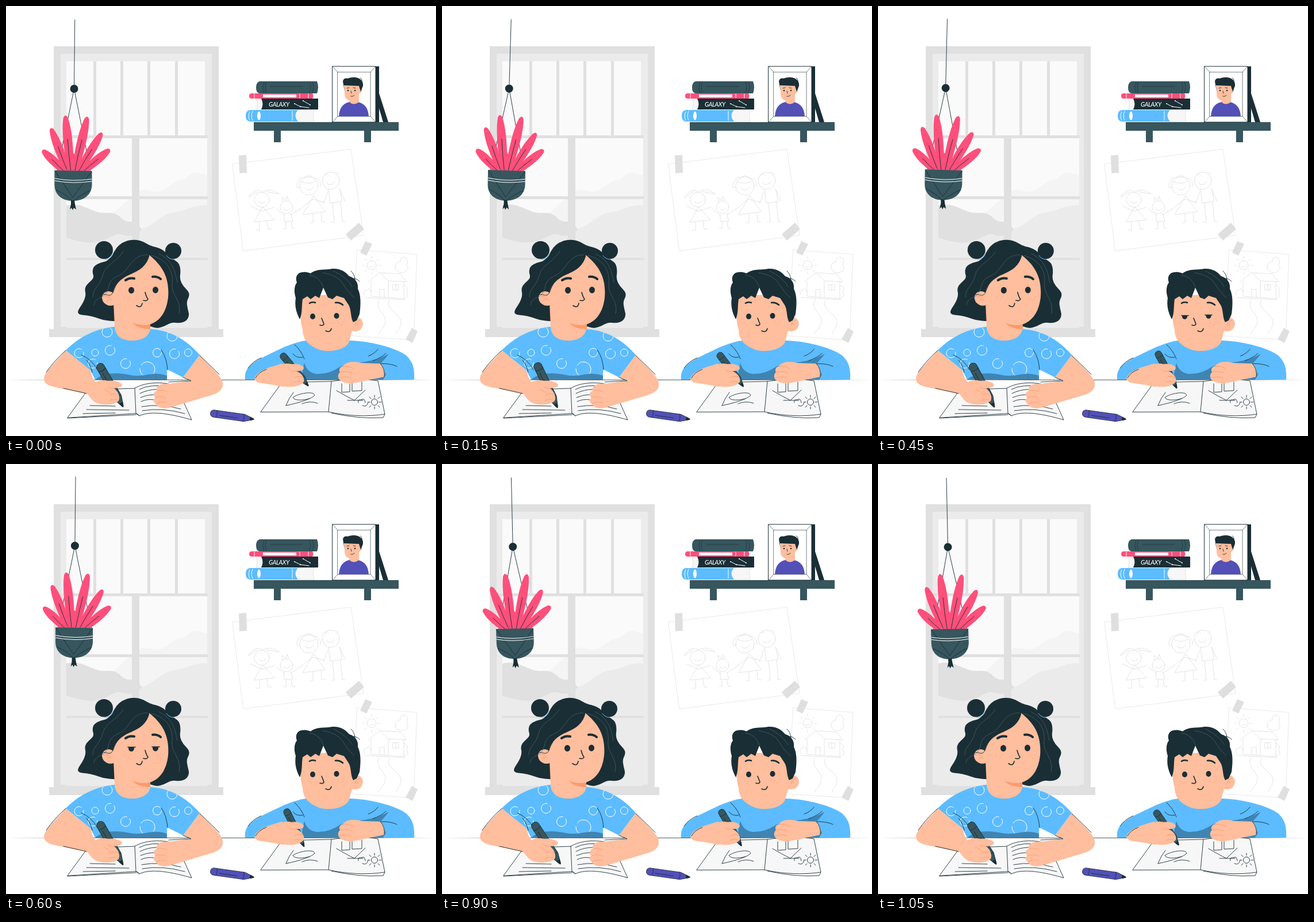
Animation of 748x748 px, one loop 1200 ms. Source, as an HTML page:

```html
<!DOCTYPE html>
<html lang="en">
<head>
<meta charset="utf-8">
<title>Drawing at the table</title>
<style>
  html, body { margin: 0; width: 100%; height: 100%; overflow: hidden; background: #fff; }
  svg { display: block; width: 100%; height: 100%; }
  path, circle, ellipse { stroke-linecap: round; stroke-linejoin: round; }
  .ink { fill: none; stroke: #1a2e35; stroke-width: .9; }
  .fine { stroke-width: .6; }
  .bold { stroke-width: 1.6; }
  .white { fill: none; stroke: #fff; stroke-width: 1; }
  .sketch { fill: none; stroke: #dedede; stroke-width: .8; }
  .paper { fill: #fff; stroke: #e4e4e4; stroke-width: .8; }
  .page { fill: #f7f7f7; stroke: #1a2e35; stroke-width: .9; }
  .fold { fill: none; stroke: #ff9a6c; stroke-width: .9; }
  .strand { fill: none; stroke: #52656b; stroke-width: .7; }
  .dark { fill: #1a2e35; }
  .slate { fill: #37565e; }
  .skin { fill: #ffbe9d; }
  .blue { fill: #5cbcff; }
  .shade { fill: #4084b2; }
  .pink { fill: #ff4f7b; }
  .purple { fill: #5350b8; }
  .orange { fill: #ff9a6c; }
  .grey { fill: #e0e0e0; }
  .pale { fill: #ebebeb; }
  .glass { fill: #fafafa; }
</style>
</head>
<body>
<svg viewBox="0 0 748 748">
  <defs>
    <g id="pen">
      <path d="M-7-37Q-6-43 0-43T7-37L7 24 2 39Q0 44-2 39L-7 24Z" stroke="#1a2e35" stroke-width=".9"/>
      <path class="dark" d="M-3.500 35H3.500L1.500 42Q0 45-1.500 42Z"/>
      <path class="ink" d="M-7-31Q0-28 7-31M-7 22Q0 25 7 22M-2-25V10"/>
    </g>
    <g id="leaf">
      <path class="pink" d="M-5 0C-8-35-10-70-4-95Q0-103 4-95C10-70 8-35 5 0Z"/>
      <path class="ink" vector-effect="non-scaling-stroke" d="M0-4Q-1-30 0-58"/>
    </g>
    <clipPath id="shirtClip"><use href="#shirt"/></clipPath>
    <clipPath id="glassClip"><path d="M105 230H350V560H105Z"/></clipPath>
  </defs>

  <!-- window -->
  <path class="grey" d="M83 70H370V563H83Z"/>
  <path class="pale" d="M95 83H358V558H95Z"/>
  <path class="glass" d="M105 96H346V226H105ZM105 230H350V440H105Z"/>
  <g clip-path="url(#glassClip)">
    <path fill="#f4f4f4" d="M232 322C244 314 254 326 268 322S292 304 304 303 318 290 330 290 343 296 350 294V390H232ZM185 362L220 330V390H185Z"/>
    <path class="pale" d="M105 400L232 388C255 386 268 362 292 359S325 345 350 347V560H105Z"/>
    <path class="grey" d="M105 347C126 342 139 351 155 357S180 357 191 362 203 376 218 375 229 383 237 388C226 399 216 402 203 398S181 404 165 409 133 412 105 403Z"/>
  </g>
  <path class="grey" d="M152 96H157V226H152ZM199 96H204V226H199ZM246 96H251V226H246ZM294 96H299V226H294ZM95 225H351V230H95ZM219 230H232V438H219ZM105 331H351V336H105ZM105 438H351V442H105ZM75 562H378V576H75Z"/>

  <!-- shelf, books, picture frame -->
  <path class="slate" d="M431 202H683V217H635V237H623V217H478V237H466V217H431Z"/>
  <path fill="#f7f7f7" d="M502 181H536Q533 191 536 201H502ZM435 161H452V181H435Q439 171 435 161Z" stroke="#d8d8d8" stroke-width=".7"/>
  <path class="slate" d="M441 131H541Q545 141 541 152H441Q435 151 435 142T441 131Z"/>
  <path class="pink" d="M427 152H533Q536 156 533 161H427Q423 161 423 156.500T427 152Z"/>
  <path class="dark" d="M444 161H543V180H444Q449 171 444 161Z"/>
  <path class="blue" d="M424 181H508Q499 190 508 201H424Q417 200 417 191T424 181Z"/>
  <path fill="#fff" d="M447 154H505V159H447Z"/>
  <ellipse cx="440" cy="191" rx="3" ry="7.500" fill="#fff"/>
  <path class="ink fine" d="M449 133Q445 142 449 151M453 133Q449 142 453 151M460 140H516M528 132Q532 142 528 151M533 132Q537 142 533 151"/>
  <path class="white fine" d="M432 153V160M511 153V160M526 153V160M424 184Q420 191 424 199M429 183Q425 191 429 199M498 183V199M502 170L512 175M512 175L527 177M517 165L529 172"/>
  <g fill="#fff"><circle cx="502" cy="170" r=".9"/><circle cx="512" cy="175" r=".9"/><circle cx="517" cy="165" r=".9"/><circle cx="529" cy="172" r=".9"/></g>
  <text x="457" y="175" fill="#fff" font-family="Lato, sans-serif" font-size="10.500" font-style="italic" font-weight="500" letter-spacing="-.4">GALAXY</text>

  <path class="dark" d="M642 105H649V152L665 202H656L649 178V202H642Z"/>
  <path fill="#fff" stroke="#1a2e35" d="M568 105H643V202H568Z"/>
  <path class="ink fine" d="M577 115H634V192H577ZM568 105L577 115M643 105L634 115M568 202L577 192M643 202L634 192"/>
  <path class="purple" d="M579 192C580 177 586 170 597 167H612C624 170 630 177 631 192Z"/>
  <path class="skin" d="M589 136H615Q622 142 618 150L614 153V167Q605 174 597 167V164Q589 162 589 152Z"/>
  <path class="dark" d="M589 149L586 131Q587 125 594 126 606 122 614 126 622 130 621 139L617 149 614 139 588 138Z"/>
  <path class="ink" d="M593 143L597 142M604 142L608 143M600 148L601 152M600 157Q604 158 606 155M619 132Q620 127 616 125"/>
  <circle class="dark" cx="595" cy="147" r="1.300"/><circle class="dark" cx="607" cy="147" r="1.300"/>

  <!-- drawings on the wall -->
  <path class="paper" d="M394 275L600 249 622 399 413 426Z"/>
  <path class="paper" d="M611 424L715 432 709 581 603 574Z"/>
  <path fill="#dfdfdf" d="M405 260L418 259 419 290 406 291ZM591 397L614 377 623 388 600 408ZM625 409L637 414 627 434 616 429ZM706 560L716 566 707 586 695 580Z"/>
  <g class="sketch">
    <circle cx="445" cy="337" r="13"/><circle cx="488" cy="350" r="11"/><circle cx="527" cy="313" r="16"/><circle cx="565" cy="304" r="15"/>
    <path d="M422 333C428 321 441 317 446 324 456 317 468 321 475 327M422 333L437 323M475 327L453 323M439 340Q446 347 452 339M446 350L431 376 467 372ZM425 348L446 357 467 350M441 376V390H435M454 374L456 388H462"/>
    <path d="M482 341L480 333 487 338 489 331 492 338M483 353Q489 359 494 352M484 362V375L499 374 495 361M470 353L484 364M496 363L512 353M487 376V387H482M496 375L498 387H503"/>
    <path d="M512 315Q503 319 507 308T520 298Q528 292 535 299 550 302 547 314M514 305Q525 312 539 305M520 317Q528 325 535 315M535 330L516 363 555 358ZM510 354L533 336 555 342M534 361V377H529M548 360L549 375H555"/>
    <path d="M552 296Q558 289 561 294M558 308Q566 315 572 305M561 319L564 343 585 340 580 317M560 323L552 344M581 320L590 340M568 343L571 376H566M582 341L585 375H590M573 289L578 293"/>
    <circle cx="636" cy="451" r="8"/>
    <path d="M636 439V435M645 443L648 440M648 451H652M645 459L648 462M636 463V467M627 459L624 462M624 451H620M627 443L624 440M632 453Q636 457 640 452"/>
    <path d="M677 456Q676 446 686 445 685 435 694 437 702 442 697 450 703 459 693 463 682 467 677 456Z"/>
    <path d="M630 480L650 464 686 466 697 480 665 478 650 464M635 479V505L692 509V480M665 479V507M650 506V493H658V507M673 485H683V494H673ZM678 485V494M624 503Q620 495 628 494 632 488 635 498M692 486Q702 488 697 497 703 506 692 509M624 507L694 511"/>
    <path d="M650 510C638 526 662 535 660 549S646 567 649 570M667 512C657 528 690 536 687 552S677 564 680 570"/>
  </g>

  <!-- table edge, thinning towards both ends -->
  <path class="dark" d="M0 650.400Q374 649.600 748 650.400 374 651.200 0 650.400Z"/>

  <!-- hanging plant -->
  <g id="plant">
    <path class="ink" d="M119.700 24L118.500 144 89 287M118.500 144L147 287"/>
    <circle class="dark" cx="118.500" cy="144" r="7"/>
    <path class="pink" d="M91 288L105 268 117 256 130 267 143 288Z"/>
    <use href="#leaf" transform="translate(113 290) rotate(-5.600) scale(1 1.010)"/>
    <use href="#leaf" transform="translate(119 290) rotate(13) scale(1 1.010)"/>
    <use href="#leaf" transform="translate(108 290) rotate(-21) scale(.95 .840)"/>
    <use href="#leaf" transform="translate(125 290) rotate(31) scale(.95 .820)"/>
    <use href="#leaf" transform="translate(104 290) rotate(-46) scale(.95 .570)"/>
    <use href="#leaf" transform="translate(132 290) rotate(50) scale(.95 .640)"/>
    <path class="slate" d="M84.500 286L149.500 287V311C149 329 135 339 116 339S84 328 84.500 310Z"/>
    <path class="ink" d="M86 288L116 333 149 288M87 320Q104 327 116 340 133 326 147 321"/>
    <path class="white" d="M85 300Q116 306 149 301M85 304Q116 310 149 305"/>
    <path class="dark" d="M113 338H119L120 345 122 354 118 351 116 355 114 351 111 354 113 345Z"/>
  </g>

  <!-- girl -->
  <g class="girlHead">
    <path class="dark" data-points="186 432 192 420 203 411 218 406 236 408 250 417 268 421 280 430 291 441 301 447 304 460 302 475 308 487 318 497 319 505 314 514 316 527 319 538 314 548 302 552 288 550 276 557 262 561 248 556 188 548 170 547 155 541 140 538 127 537 124 531 135 515 139 502 137 494 139 486 148 478 153 472 150 462 153 452 165 446 176 444"/>
    <circle class="dark" cx="170.500" cy="424.500" r="15.500"/><circle class="dark" cx="291" cy="426" r="14"/>
    <path d="M172 441Q184 440 186 431M279 434Q283 440 291 441" fill="none" stroke="#5cbcff"/>
  </g>
  <path id="shirt" class="blue" d="M104 599C127 576 153 562 188 558L251 562C287 564 316 582 337 607L308 646 280 632V650H155L147 634Z"/>
  <g clip-path="url(#shirtClip)">
    <g class="white" stroke-dasharray="42 6">
      <circle cx="127" cy="604" r="8"/><circle cx="155" cy="603" r="6"/><circle cx="181" cy="599" r="8.500"/><circle cx="208" cy="622" r="8.500"/><circle cx="246" cy="632" r="13"/><circle cx="151" cy="622" r="8"/><circle cx="176" cy="567" r="9"/><circle cx="263" cy="603" r="7.500"/><circle cx="293" cy="605" r="8.500"/><circle cx="317" cy="603" r="6.500"/><circle cx="289" cy="574" r="9"/>
    </g>
    <path class="shade" d="M155 650C170 637 192 637 216 642S254 634 280 643V650Z"/>
  </g>
  <path class="ink" d="M131 607Q150 615 159 633M281 633Q280 612 270 598M150 637Q147 624 140 616"/>
  <path class="skin" d="M187 515H251V562C249 574 238 582 219 582 200 582 190 573 189 558Z"/>
  <g class="girlHead">
    <path class="skin" d="M249 433C245 453 232 460 216 467 199 474 188 486 186 499 179 493 167 497 167 508 168 519 180 524 188 520L190 556H242C267 552 279 533 282 507 285 471 271 451 249 433Z"/>
    <path class="orange" d="M220 551Q235 557 251 554V562Q231 563 220 551Z"/>
    <path class="fold" d="M172 506Q179 503 183 512M175 513L180 510"/>
    <path class="strand" d="M246 433C224 432 218 449 207 461S183 468 178 490 156 503 153 520M204 427C190 448 173 449 168 469S151 490 151 506M253 434C280 441 291 460 289 482S306 511 301 535M266 431C291 443 294 462 298 481"/>
    <path class="ink" d="M249 434C244 456 225 459 210 468S192 483 187 496 176 500 168 502"/>
    <path class="ink" style="stroke-width:4" d="M208 477Q215 472 223 474M255 471Q263 470 269 475"/>
    <ellipse class="dark" cx="218" cy="494.500" rx="5" ry="5.800"/><ellipse class="dark" cx="260" cy="494" rx="5" ry="5.800"/>
    <g id="girlLids">
      <path class="skin" d="M209 486H227V492.500H209ZM251 486H269V492H251Z"/>
      <path class="ink bold" d="M212 492.500H225M254 492H267"/>
    </g>
    <path class="ink bold" d="M242 498Q244 506 247 510 245 514 239 512M227 521Q235 527 237 517"/>
    <g class="orange"><circle cx="206" cy="507" r=".8"/><circle cx="212" cy="511" r=".8"/><circle cx="216" cy="506" r=".8"/><circle cx="264" cy="508" r=".8"/><circle cx="269" cy="512" r=".8"/><circle cx="273" cy="506" r=".8"/></g>
  </g>
  <path class="page" d="M107 716L142 668 224 665C242 654 270 653 296 660L323 720C289 710 252 703 232 713L226 709Z"/>
  <path class="ink" d="M224 665L226 709M232 713Q228 708 226 709M107 717L226 711M146 695L190 696M140 702L214 703M134 709L190 708"/>
  <path class="ink" d="M232 667Q250 657 286 662M233 674Q247 667 262 667M234 681Q246 676 257 676M235 688Q246 683 257 685M236 697Q269 691 304 701M237 704Q272 698 311 709"/>
  <path class="skin" d="M104 599C92 614 74 629 67 643 63 656 73 661 90 664L142 675C148 685 160 694 177 693L150 645 147 634Z"/>
  <g id="girlPen" class="slate"><use href="#pen" transform="translate(182.500 660) rotate(-29.800)"/></g>
  <path class="skin" d="M139 666C151 653 166 649 178 652 187 651 196 653 201 657 205 662 195 665 188 665 196 671 199 681 196 687 187 695 168 695 156 690 148 685 143 677 139 666Z"/>
  <path class="fold" d="M190 664Q183 667 177 663M194 676Q184 673 180 678M193 685Q185 682 179 687M170 667Q178 669 183 676"/>
  <path class="skin" d="M337 607C350 624 371 639 376 652 381 667 369 674 354 678L290 697C277 702 263 700 261 692 255 691 257 683 260 681 253 676 259 670 263 669 259 660 272 656 284 657L322 652 308 646Z"/>
  <path class="fold" d="M263 669Q273 667 280 671M260 681Q272 678 279 682M261 692Q271 687 280 690"/>
  <path class="ink" d="M283 654L322 652 308 646M104 599Q83 618 70 637M100 665L140 674M337 608Q356 626 371 641"/>

  <!-- loose crayon -->
  <g class="purple"><use href="#pen" transform="translate(393.500 713.500) rotate(-82) scale(.89)"/></g>

  <!-- boy -->
  <path class="blue" d="M416 650C414 633 423 624 443 613 468 601 496 585 522 582L601 582C642 584 679 596 695 607 708 618 711 631 710 650Z"/>
  <path class="shade" d="M514 650Q516 632 519 621 524 638 540 640 562 641 582 627L645 615Q660 608 666 605 657 617 651 622L661 641 656 650Z"/>
  <path class="ink" d="M502 589Q514 600 519 614M516 611Q505 613 499 605M638 617Q653 612 661 604M630 609Q641 605 647 597M652 622Q671 622 680 627M444 612Q429 618 421 630"/>
  <path class="skin" d="M511 505C511 532 512 551 516 563 516 583 530 592 545 598 566 604 596 597 598 580L602 565C612 569 621 562 621 552 620 542 609 538 602 546L600 500Z"/>
  <path class="fold" d="M607 557Q609 547 616 547M608 552L613 555"/>
  <path class="dark" d="M511 545C504 532 502 520 504 508 500 495 502 486 506 481 502 470 508 463 517 463 522 462 526 464 530 465 541 456 557 460 567 457 584 456 592 464 597 470 610 474 613 484 612 492 618 503 617 522 615 536L610 547 604 550C599 542 601 528 596 520L588 508 575 504 568 510 560 507 552 490 545 508 538 504 530 510 524 505 516 510C514 522 516 533 511 545Z"/>
  <path class="ink" d="M599 475Q607 471 615 479M607 476Q606 466 600 461"/>
  <path class="strand" d="M528 468Q546 470 552 489M551 464Q578 468 587 484T606 507M570 461Q593 472 602 488"/>
  <path class="ink" style="stroke-width:2.600" d="M528 517Q532 514 538 516M573 516Q580 515 586 520"/>
  <ellipse class="dark" cx="533.500" cy="540" rx="4.500" ry="5"/><ellipse class="dark" cx="575" cy="539" rx="4.500" ry="5"/>
  <g id="boyLids">
    <path class="skin" d="M525 532H543V538.500H525ZM566 531H584V537.500H566Z"/>
    <path class="ink bold" d="M528 538.500H540M569 537.500H581"/>
  </g>
  <path class="ink bold" d="M549 543L553 553Q552 557 546 555M556 565Q564 569 566 561"/>
  <g class="orange"><circle cx="526" cy="552" r=".8"/><circle cx="531" cy="555" r=".8"/><circle cx="578" cy="551" r=".8"/><circle cx="584" cy="554" r=".8"/><circle cx="588" cy="549" r=".8"/></g>
  <path class="page" d="M443 706L480 655 566 653C592 649 624 648 647 652L659 710C628 715 592 713 561 706Z"/>
  <path class="ink" d="M566 653L561 706M566 708Q615 719 656 716L659 710M487 695C508 691 533 683 537 677 535 669 508 674 499 681 502 687 517 686 528 683M487 695Q492 682 500 672M515 692Q528 686 542 691"/>
  <path class="ink" d="M584 657V672L598 671V657M602 656V670L619 669V654M575 669Q590 678 606 686L625 668M594 686H621M613 690Q611 684 618 685 624 681 625 690M620 695Q628 699 630 689"/>
  <circle class="ink" cx="641" cy="689" r="5.500"/>
  <path class="ink" d="M641 681V677M647 683L650 680M649 689H653M647 695L650 698M641 697V701M635 695L632 698M633 689H630M635 683L632 680"/>
  <path class="skin" d="M432 650C432 641 443 634 457 629L480 622 510 655C499 662 482 664 470 660L438 655Z"/>
  <g id="boyPen" class="slate"><use href="#pen" transform="translate(502.500 633) rotate(-40) scale(.85)"/></g>
  <path class="skin" d="M468 634C474 623 486 620 497 623 506 621 518 625 518 630 517 635 509 635 505 635 516 640 520 648 518 654 511 663 492 664 479 661Z"/>
  <path class="fold" d="M505 635Q498 637 493 633M516 646Q507 642 502 647M514 654Q507 651 501 655"/>
  <path class="skin" d="M580 650C576 645 578 639 581 637 578 632 582 627 586 627 590 619 604 617 618 621L651 622Q661 631 658 645L610 655C599 658 586 656 580 650Z"/>
  <path class="fold" d="M586 627Q597 625 605 631M581 637Q593 634 601 638M580 647Q592 643 600 647"/>
  <path class="ink" d="M434 647Q439 637 453 632M651 622Q660 631 658 645"/>
</svg>
<script>
  const STEP = 150;
  // One value per step of the loop.
  const plantX = [0, .6, 1.3, .8, 1.3, 2.3, .8, -.7];
  const plantY = [0, -.3, -.5, -1.3, -1.8, -.3, 0, .5];
  const plantAngle = [0, 1.1, 1.5, .8, -.05, -1.35, -1.9, -1.8];
  const girlHeadX = [0, 1, 1.7, .8, 0, 0, 0, 0];
  const girlPenAngle = [0, 4.5, 7, 2, .5, -2.8, -3.5, -2.8];
  const boyPenAngle = [0, 3.2, 7, 11.6, 13.8, 12.4, 9.5, 5.5];
  const girlBlink = 4, boyBlink = 3;

  const get = id => document.getElementById(id);
  const move = (node, transform) => node.setAttribute('transform', transform);
  const show = (id, visible) => get(id).setAttribute('visibility', visible ? 'visible' : 'hidden');

  // Closed smooth outline through the midpoints of a list of points.
  function smoothOutline(text) {
    const n = text.split(' ').map(Number);
    const points = [];
    for (let i = 0; i < n.length; i += 2) points.push([n[i], n[i + 1]]);
    const middle = (a, b) => [(a[0] + b[0]) / 2, (a[1] + b[1]) / 2];
    const curves = points.map((p, i) => `Q${p} ${middle(p, points[(i + 1) % points.length])}`);
    return `M${middle(points.at(-1), points[0])}${curves.join('')}Z`;
  }
  for (const path of document.querySelectorAll('[data-points]'))
    path.setAttribute('d', smoothOutline(path.dataset.points));

  function draw(now) {
    const i = Math.floor(now / STEP) % 8;
    move(get('plant'), `translate(${plantX[i]} ${plantY[i]}) rotate(${plantAngle[i]} 119.7 24)`);
    for (const part of document.querySelectorAll('.girlHead')) move(part, `translate(${girlHeadX[i]} 0)`);
    move(get('girlPen'), `rotate(${girlPenAngle[i]} 182.5 660)`);
    move(get('boyPen'), `rotate(${boyPenAngle[i]} 502.5 633)`);
    show('girlLids', i === girlBlink);
    show('boyLids', i === boyBlink);
    requestAnimationFrame(() => draw(performance.now()));
  }
  draw(performance.now());
</script>
</body>
</html>
```
